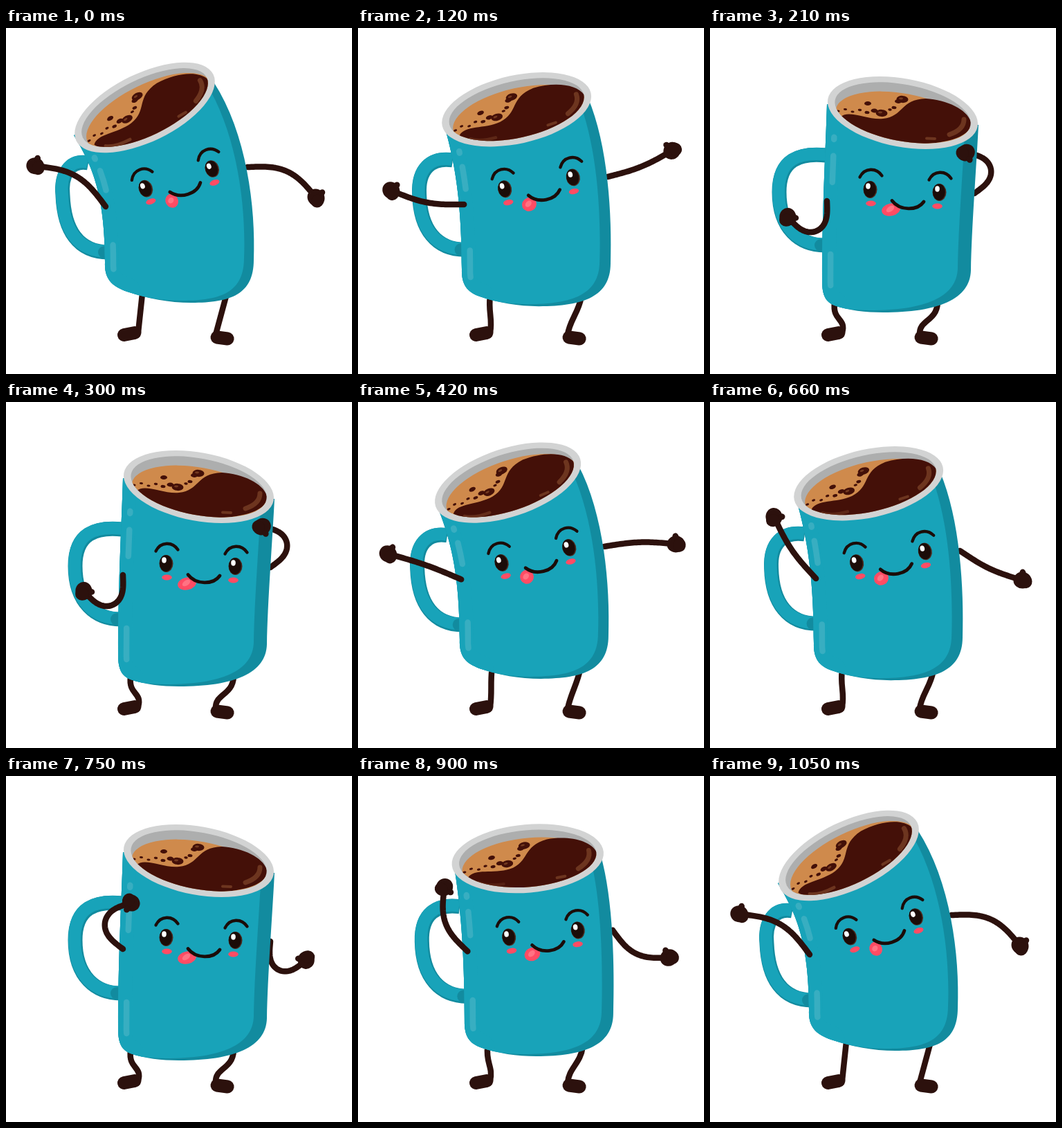
Animation, 500 px wide and 500 px high, one loop 1.08 s. Source, as an HTML page with a canvas:

```html
<!DOCTYPE html>
<html lang="en">
<head>
<meta charset="utf-8">
<title>Dancing mug</title>
<style>
  html, body { margin: 0; width: 100%; height: 100%; overflow: hidden; background: #fff; }
  canvas { display: block; width: 500px; height: 500px; }
</style>
</head>
<body>
<canvas width="500" height="500"></canvas>
<script>
const ctx = document.querySelector('canvas').getContext('2d');
const LOOP = 1080, HALF = 540, STEP = 30, TURN = 255, STOP = 198;
const TEAL = '#18a3b9', SHADE = '#128b9f', SHINE = '#38aec1';
const LIMB = '#2c110d', INK = '#1b0c08', PINK = '#ff4c64';
const COFFEE = '#441008', CREMA = '#cf8a4c', GLOSS = '#6d351f';

// Shoulder when leaning and upright; start and end heading of the arm
// at rest and at the peak of each half of the dance.
const LEFT = { side: 1, shoulder: [[144, 258], [169, 250]], reach: 123,
  rest: [233, 187], peaks: [[88, 228], [217, 343]] };
const RIGHT = { side: -1, shoulder: [[349, 201], [382, 239]], reach: 115,
  rest: [-2, 50], peaks: [[-36, -167], [95, -40]] };

const rad = deg => deg * Math.PI / 180;
const mix = (a, b, k) => a + (b - a) * k;
const blend = (a, b, k) => a.map((v, i) => mix(v, b[i], k));

// 0 = leaning left, 1 = upright: speeds up, holds, then mirrors back.
function uprightness(t) {
  const u = Math.max(0, TURN - Math.abs(TURN - t));
  return Math.min(1, (u / STOP) ** 2);
}

// Traces a start point followed by cubic segments.
function trace(p) {
  ctx.beginPath();
  ctx.moveTo(p[0], p[1]);
  for (let i = 2; i < p.length; i += 6) ctx.bezierCurveTo(...p.slice(i, i + 6));
}

function fill(p, color) {
  trace(p);
  ctx.fillStyle = color;
  ctx.fill();
}

function ink(color, width, cap = 'round') {
  ctx.strokeStyle = color;
  ctx.lineWidth = width;
  ctx.lineCap = cap;
  ctx.stroke();
}

function stroke(p, color, width, cap) {
  trace(p);
  ink(color, width, cap);
}

function line(x1, y1, x2, y2, color, width) {
  ctx.beginPath();
  ctx.moveTo(x1, y1);
  ctx.lineTo(x2, y2);
  ink(color, width);
}

function oval(x, y, rx, ry, color, deg = 0) {
  ctx.beginPath();
  ctx.ellipse(x, y, rx, ry, rad(deg), 0, 7);
  ctx.fillStyle = color;
  ctx.fill();
}

// Runs a drawing inside its own saved transform.
function group(x, y, deg, paint) {
  ctx.save();
  ctx.translate(x, y);
  ctx.rotate(rad(deg));
  paint();
  ctx.restore();
}

// An arm is a line whose heading eases from start to end, bending at the elbow.
function poseArm({ side, shoulder, reach, rest, peaks }, half, k) {
  const [from, to] = blend(rest, peaks[half], k);
  const length = reach - 24 * Math.sqrt(k), parts = 40;
  let [x, y] = blend(...shoulder, k);
  const points = [[x, y]];
  for (let i = 0; i < parts; i++) {
    const s = (i + .5) / parts, ease = s ** 3 * (10 - 15 * s + 6 * s * s);
    const heading = rad(mix(from, to, ease));
    x += Math.cos(heading) * length / parts;
    y += Math.sin(heading) * length / parts;
    points.push([x, y]);
  }
  return { points, x, y, thumb: to + side * (95 + 40 * k) };
}

function drawArm({ points }) {
  ctx.beginPath();
  points.forEach(p => ctx.lineTo(...p));
  ctx.lineJoin = 'round';
  ink(LIMB, 8.5);
}

function drawHand({ x, y, thumb }) {
  group(x, y, thumb, () => {
    oval(0, 0, 12, 13, LIMB);
    oval(-2, 5, 10, 9, LIMB);
    oval(11, 1, 5, 4.5, LIMB);
  });
}

// The knee bows outward as the body sinks.
function drawLeg(hipX, hipY, footX, footY, bow) {
  const dx = (footX - hipX) / 3, dy = (footY - hipY) / 3, b = Math.abs(bow);
  stroke([hipX, hipY, hipX + dx + 7 * bow, hipY + dy + 12 * b,
    footX - dx - 10 * bow, footY - dy - 6 * b, footX, footY], LIMB, 8.5);
}

function drawLegs(k) {
  const hipY = mix(384, 397, k);
  drawLeg(mix(197, 180, k), hipY, 191, 440, -k);
  drawLeg(mix(319, 329, k), hipY, 303, 443, k);
  line(170.5, 443.5, 186, 440.5, LIMB, 19);
  line(305, 447, 320, 449, LIMB, 19);
}

function drawHandle(k) {
  const curve = blend([119, 195, 92, 190, 79, 212, 82, 242, 84, 292, 104, 324, 148, 324],
    [168, 184, 130, 180, 100, 190, 100, 237, 100, 290, 130, 314, 166, 314], k);
  stroke(curve, SHADE, 21, 'butt');
  group(-1, -1.2, 0, () => stroke(curve, TEAL, 18, 'butt'));
  const [x, y] = curve.slice(-2);
  line(x - 6, y, x, y, SHADE, 18);
}

function drawBody(k) {
  const outline = blend(
    [98, 155, 122, 195, 143, 235, 143, 338, 142, 362, 152, 373, 175, 381,
      205, 391, 235, 397, 268, 397, 325, 397, 358, 385, 358, 335, 361, 260, 348, 152, 300, 78],
    [169, 110, 167, 180, 162, 260, 162, 365, 162, 388, 168, 396, 180, 401,
      200, 408, 225, 411, 250, 411, 330, 411, 376, 392, 377, 350, 378, 290, 385, 200, 388, 140], k);
  fill(outline, SHADE);
  ctx.save();
  ctx.clip();
  group(mix(-14, -19, k), -3, 0, () => fill(outline, TEAL));
  // Left of the shifted copy the wall is lit, not shaded.
  const wall = outline.slice(0, 14);
  stroke(wall, TEAL, 40);
  // Gloss: a dot and two dashes that follow the wall.
  ctx.translate(12, 0);
  const scale = mix(.77, 1, k);
  ctx.setLineDash([0, 48, 3, 24, 38, 104, 45, 999].map(v => v * scale));
  stroke(wall, SHINE, 8.5);
  ctx.restore();
}

// A row of bubbles that get smaller and zigzag slightly.
function bubbles(x, y, dx, dy, count) {
  for (let i = 0; i < count; i++) {
    const r = Math.max(2.6, 8.5 / (1 + i * .7));
    const bx = x + dx * i, by = y + dy * i - (i % 2) * 3;
    oval(bx, by, r, r * .6, COFFEE, 4);
    if (!i) oval(bx - 2, by - 1, 3, 1.4, '#743a20');
  }
}

function drawCoffee(k) {
  fill([188, 129, 200, 117, 225, 133, 250, 131, 280, 128, 275, 103, 312, 102,
    345, 104, 376, 120, 378, 140, 372, 162, 325, 170, 280, 167, 235, 163, 200, 152, 188, 129], COFFEE);
  bubbles(248, 123, -10.5, -.5, 7);
  bubbles(278, 103, -6, 6, 4);
  oval(228, 109, 5, 3, COFFEE);
  stroke([367, 132, 367, 143, 358, 150, 346, 154], GLOSS, 7);
  line(313, 159.5, 325, 160, GLOSS, 4);
  ctx.globalAlpha = 1 - k;
  stroke([201, 139, 210, 146, 222, 149, 236, 150], GLOSS, 4.5);
}

function drawTop(k) {
  group(mix(200.5, 278.5, k), mix(115, 122.5, k), mix(-25.8, 10.5, k), () => {
    oval(0, 0, 110, 49.3, '#d2d3d3');
    oval(0, 0, 99.5, 41, '#adaeae');
    ctx.clip();
    oval(3, mix(8.5, 12.5, k), 99, 40.5, CREMA);
    // The liquid turns a little less than the cup.
    ctx.rotate(rad(mix(-6.5, -10.5, k)));
    ctx.translate(-278.5, -122.5);
    drawCoffee(k);
  });
}

function drawSide(x, y) {
  oval(x, y, 10, 12.5, '#4b2b20');
  oval(x - .6, y - .4, 9, 11.8, INK);
  oval(x - 3, y - 5, 3.3, 4.2, '#fff');
  stroke([x - 15, y - 18, x - 8, y - 32, x + 9, y - 32, x + 17, y - 20], INK, 4.3);
}

function drawFace(k) {
  group(mix(249.8, 281.5, k), mix(217.8, 235.5, k), mix(-18.9, 0, k), () => {
    drawSide(-50, -2);
    drawSide(50, 2);
    oval(-49, 18, 7.3, 4, PINK);
    oval(47, 22, 7.3, 4, PINK);
    oval(-20, 27, mix(9, 13.5, k), mix(10.3, 9, k), PINK, -12);
    oval(-21, 26, mix(4.5, 6.5, k), 3.8, '#ff7383', -35);
    stroke([-18.5, 14, -7, 29, 18, 29, 27.5, 15.5], INK, 4.8);
  });
}

function draw(time) {
  const t = Math.floor(time % LOOP / STEP) * STEP;
  const half = t < HALF ? 0 : 1, k = uprightness(t % HALF);
  const left = poseArm(LEFT, half, k), right = poseArm(RIGHT, half, k);
  ctx.fillStyle = '#fff';
  ctx.fillRect(0, 0, 500, 500);
  drawLegs(k);
  drawArm(right);
  drawHandle(k);
  drawBody(k);
  drawTop(k);
  drawFace(k);
  drawArm(left);
  drawHand(left);
  drawHand(right);
}

const start = performance.now();
function tick() {
  draw(performance.now() - start);
  requestAnimationFrame(tick);
}
tick();
</script>
</body>
</html>
```
